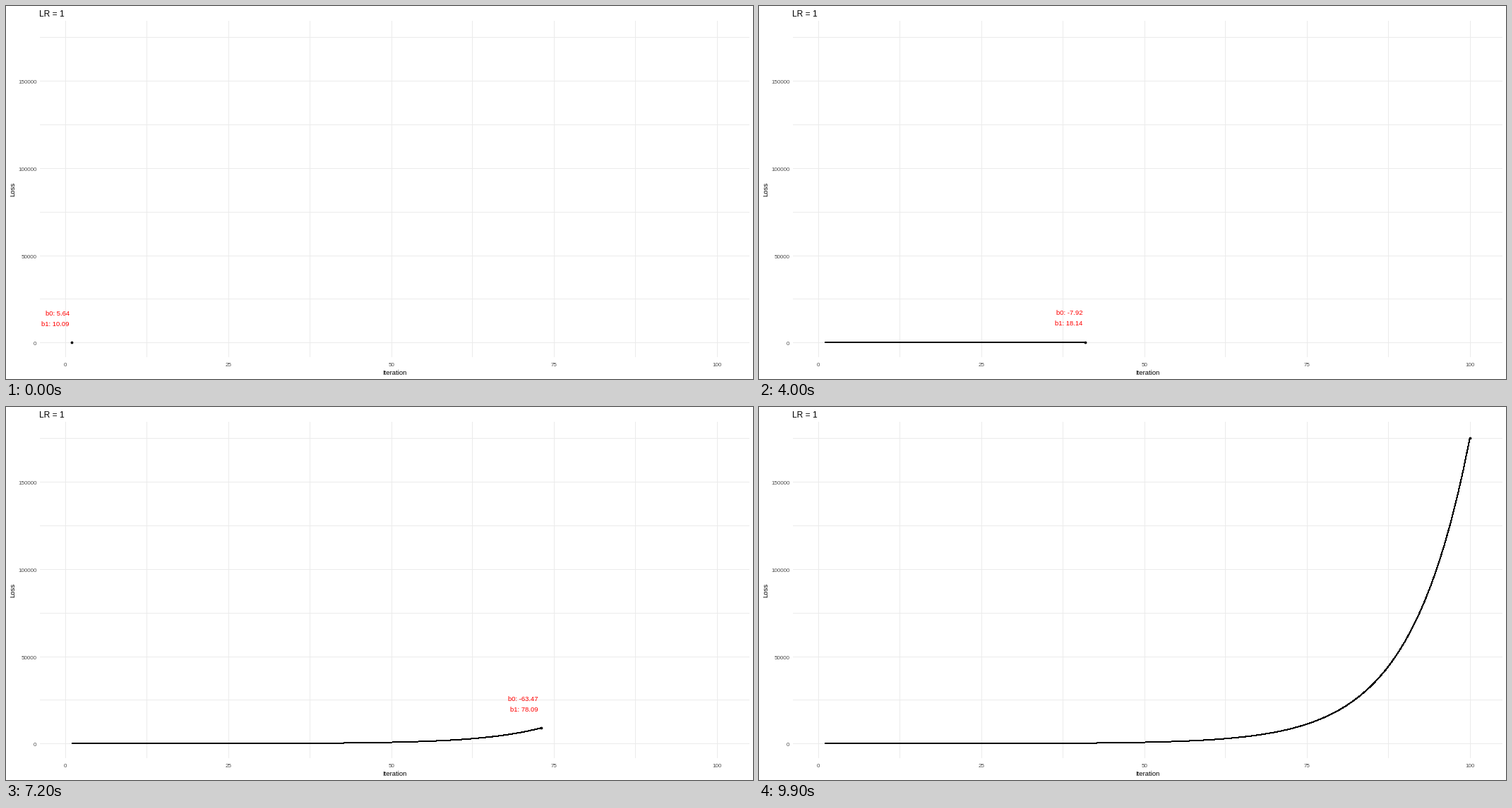
A matplotlib script for the animation above (10000 ms loop, 1058 by 529 pixels).

```python
import numpy as np
import matplotlib.pyplot as plt
from matplotlib.animation import FuncAnimation
from matplotlib.patches import Rectangle

W, H, DPI = 1058, 529, 100
PT = 72 / DPI                       # points per pixel
STEPS = 100
X0, X_UNIT = 84.15, 9.227           # pixel of iteration 0, pixels per iteration
Y0, LOSS_PER_PX = 477.3, 404.0      # pixel of zero loss, loss per pixel
LEFT, RIGHT, TOP, BOTTOM = 48, 1053, 21, 498
GRID, TICK = "#ebebeb", "#4d4d4d"

# Gradient descent on a quadratic loss: one mode grows, one decays,
# and both flip their sign at every step.
GROW, DECAY = 1.056577, 0.95275
it = np.arange(1, STEPS + 1)
sign = np.where(it % 2 == 1, 1, -1)
fast = sign * GROW ** (it - 51.0)
slow = sign * DECAY ** (it - 1.0)
b0 = 2.95 + 3.952 * slow - 19.827 * fast
b1 = 5.0985 + 3.61 * slow + 21.7165 * fast


def energy(rate, *amps):
    return 0.5 * (1 + rate) * sum(a * a for a in amps)


# The loss is taken before each update.
loss = (energy(GROW, 19.827, 21.7165) * (fast / GROW) ** 2
        + energy(DECAY, 3.952, 3.61) * (slow / DECAY) ** 2)


def px(i):
    return X0 + X_UNIT * i


def py(value):
    return Y0 - value / LOSS_PER_PX


xs, ys = px(it), py(loss)

plt.rcParams["font.family"] = "Liberation Sans"
fig = plt.figure(figsize=(W / DPI, H / DPI), dpi=DPI, facecolor="white")
ax = fig.add_axes([0, 0, 1, 1])
ax.set_xlim(0, W)
ax.set_ylim(H, 0)
ax.axis("off")


def line(x, y, color, **kw):
    return ax.plot(x, y, color=color, lw=PT, snap=False,
                   solid_capstyle="butt", **kw)[0]


def text(x, y, s, size, color="black", ha="center", va="baseline", **kw):
    return ax.text(x, y, s, fontsize=size * PT, color=color, ha=ha, va=va, **kw)


for k in range(8):
    row = int(py(25000 * k) + 0.5)
    line([LEFT, RIGHT], [row + 0.5] * 2, GRID, zorder=1)
    if k % 2 == 0:
        text(43.5, row + 4, str(25000 * k), 8, TICK, ha="right")

for k in range(9):
    major = k % 2 == 0
    col = int(px(12.5 * k) + (0.5 if major else 0))
    line([col + 0.5] * 2, [TOP, BOTTOM], GRID, zorder=1)
    if major:
        text(col, 511, str(25 * k // 2), 8, TICK)

text(47, 15, "LR = 1", 12, ha="left")
text(550, 523, "Iteration", 9.5)
text(10, 260, "Loss", 9.5, va="center", rotation=90)

panel = Rectangle((LEFT, TOP), RIGHT - LEFT, BOTTOM - TOP,
                  transform=ax.transData)
curve = line([], [], "black", antialiased=False, zorder=3)
dot, = ax.plot([], [], "o", color="black", ms=3.8 * PT, mew=0, zorder=4)
labels = [text(0, 0, "", 9.5, "red", ha="right", clip_on=True, zorder=5)
          for _ in range(2)]
for lab in labels:
    lab.set_clip_path(panel)


def update(n):
    x, y = xs[n], ys[n]
    curve.set_data(xs[:n + 1], ys[:n + 1])
    dot.set_data([x], [y])
    values = (("b0", b0[n], -38.5), ("b1", b1[n], -23.5))
    for lab, (name, value, dy) in zip(labels, values):
        lab.set_text(f"{name}: {value:.2f}")
        # The gap to the point is a tenth of the text's own width.
        gap = 0.1 * lab.get_window_extent().width
        lab.set_position((x - gap, y + dy))
    return curve, dot, *labels


anim = FuncAnimation(fig, update, frames=STEPS, interval=100,
                     repeat=True, repeat_delay=0, blit=False)
plt.show()
```
